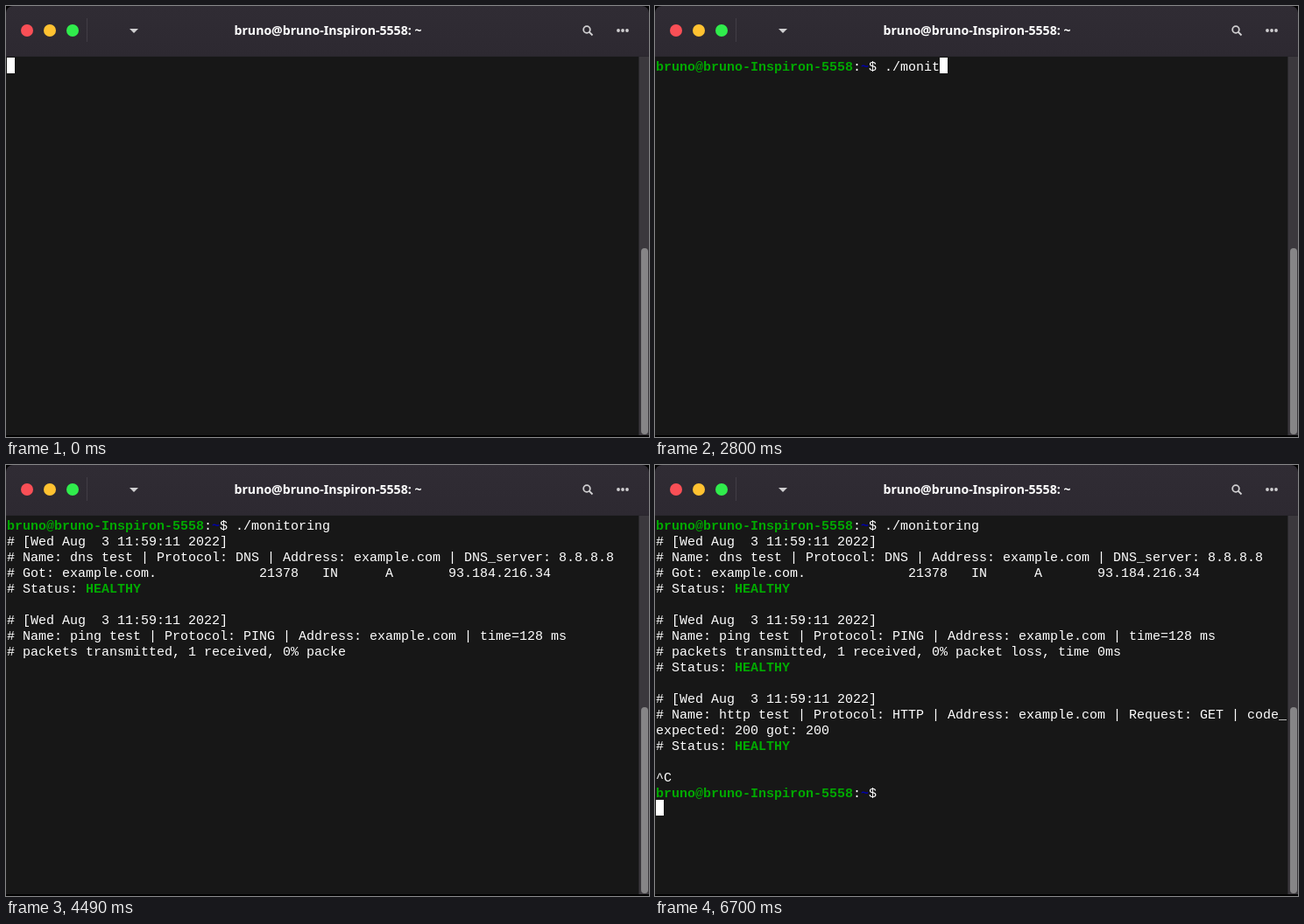
Recreate the animation shown at these times as an HTML page with a canvas. Size 734x493 px, loop 7.7 s.

```html
<!DOCTYPE html>
<html lang="en">
<head>
<meta charset="utf-8">
<title>Terminal</title>
<style>
  html, body { margin: 0; width: 100%; height: 100%; overflow: hidden; background: #000; }
  canvas { display: block; }
</style>
</head>
<body>
<canvas id="stage" width="734" height="493"></canvas>
<script>
const ctx = document.getElementById('stage').getContext('2d');
const LOOP = 7700, COLS = 80, CELL_W = 9, CELL_H = 18, LEFT = 1, TOP = 59, BASELINE = 15;
const HOST = 'bruno@bruno-Inspiron-5558';
const MONO = '15px "Liberation Mono", monospace';
const WHITE = { color: '#ffffff', font: MONO };
const GREEN = { color: '#00aa00', font: 'bold ' + MONO };
const BLUE = { color: '#0000aa', font: 'bold ' + MONO };

// All terminal output is one list of characters; each step reveals a prefix of it.
const chars = [];
const steps = [];

function put(text, style = WHITE) {
  for (const ch of text) chars.push({ ch, style });
}

function mark(ms, cursor = true, count = chars.length) {
  steps.push({ ms, cursor, count });
}

function type(ms, text) {
  put(text);
  mark(ms);
}

function prompt() {
  put(HOST, GREEN);
  put(':');
  put('~', BLUE);
  put('$ ');
}

// Reveals everything written since `from` in equal portions.
function flow(from, times) {
  const total = chars.length - from;
  times.forEach((ms, i) => mark(ms, false, from + Math.round(total * (i + 1) / times.length)));
}

function status() {
  put('# Status: ');
  put('HEALTHY', GREEN);
  put('\n\n');
}

const stamp = '# [Wed Aug  3 11:59:11 2022]\n';

mark(0);
prompt();
type(1710, '.');
type(1900, '/');
type(2230, 'm');
type(2350, 'o');
type(2560, 'n');
type(2590, 'i');
type(2800, 't');
type(2890, 'o');
type(3180, 'ring ');
put('\n');
mark(3920, false);

let start = chars.length;
put(stamp);
put('# Name: dns test | Protocol: DNS | Address: example.com | DNS_server: 8.8.8.8\n');
put('# Got: example.com.'.padEnd(32) + '21378   IN      A       93.184.216.34\n');
status();
put(stamp);
put('# Name: ping test | Protocol: PING | Address: example.com | time=128 ms\n');
put('# packets transmitted, 1 received, 0% packe');
flow(start, [3960, 4060, 4170, 4280, 4390, 4490]);

put('t loss, time 0ms\n');
status();
mark(4590, false);

start = chars.length;
put(stamp);
put('# Name: http test | Protocol: HTTP | Address: example.com | Request: GET | code_expected: 200 got: 200\n');
put('# Status: ');
flow(start, [4700, 4800]);
mark(4900);

put('HEALTHY', GREEN);
put('\n\n');
mark(5590);
put('^C\n');
prompt();
put('\n');
mark(6700);

function rect(x, y, w, h, color) {
  ctx.fillStyle = color;
  ctx.fillRect(x, y, w, h);
}

function dot(x, y, r, color) {
  ctx.fillStyle = color;
  ctx.beginPath();
  ctx.arc(x, y, r, 0, Math.PI * 2);
  ctx.fill();
}

function roundBox(x, y, w, h, radii, color) {
  ctx.fillStyle = color;
  ctx.beginPath();
  ctx.roundRect(x, y, w, h, radii);
  ctx.fill();
}

function drawHeader() {
  const shade = ctx.createLinearGradient(0, 0, 0, 58);
  shade.addColorStop(0, '#302c34');
  shade.addColorStop(1, '#2d2931');
  roundBox(0, 0, 734, 58, [8, 8, 0, 0], shade);
  rect(0, 57, 734, 1, '#29262d');

  dot(24, 28, 7, '#f94f56');
  dot(50, 28, 7, '#ffc231');
  dot(76, 28, 7, '#30ec4c');
  rect(92, 14, 1, 27, '#423e46');

  const icon = '#d0cfd1';
  ctx.fillStyle = icon;
  ctx.beginPath();
  ctx.moveTo(141, 26);
  ctx.lineTo(151, 26);
  ctx.lineTo(146, 31);
  ctx.fill();

  ctx.strokeStyle = icon;
  ctx.lineWidth = 1.8;
  ctx.beginPath();
  ctx.arc(663, 27, 3.8, 0, Math.PI * 2);
  ctx.moveTo(666, 30);
  ctx.lineTo(669.5, 33.5);
  ctx.stroke();
  for (const x of [699, 704, 709]) dot(x, 28, 1.9, icon);

  ctx.fillStyle = '#ffffff';
  ctx.font = 'bold 14.1px "Noto Sans", "Open Sans", sans-serif';
  ctx.textAlign = 'center';
  ctx.fillText(HOST + ': ~', 367.5, 33);
  ctx.textAlign = 'left';
}

function drawScrollbar() {
  rect(722, 58, 12, 433, '#3b383d');
  rect(722, 58, 1, 433, '#2b292d');
  roundBox(725, 277, 8, 213, 4, '#868587');
}

function drawText({ count, cursor }) {
  let col = 0, row = 0;
  for (const { ch, style } of chars.slice(0, count)) {
    if (ch === '\n') {
      col = 0;
      row++;
      continue;
    }
    if (col === COLS) {
      col = 0;
      row++;
    }
    ctx.fillStyle = style.color;
    ctx.font = style.font;
    ctx.fillText(ch, LEFT + col * CELL_W, TOP + row * CELL_H + BASELINE);
    col++;
  }
  if (cursor) rect(LEFT + col * CELL_W, TOP + row * CELL_H, CELL_W, CELL_H, '#ffffff');
}

function draw(ms) {
  rect(0, 0, 734, 493, '#000000');
  rect(0, 58, 722, 433, '#171717');
  drawHeader();
  drawScrollbar();
  drawText(steps.findLast(step => step.ms <= ms));
}

const began = performance.now();
function tick() {
  draw((performance.now() - began) % LOOP);
  requestAnimationFrame(tick);
}
tick();
</script>
</body>
</html>
```
